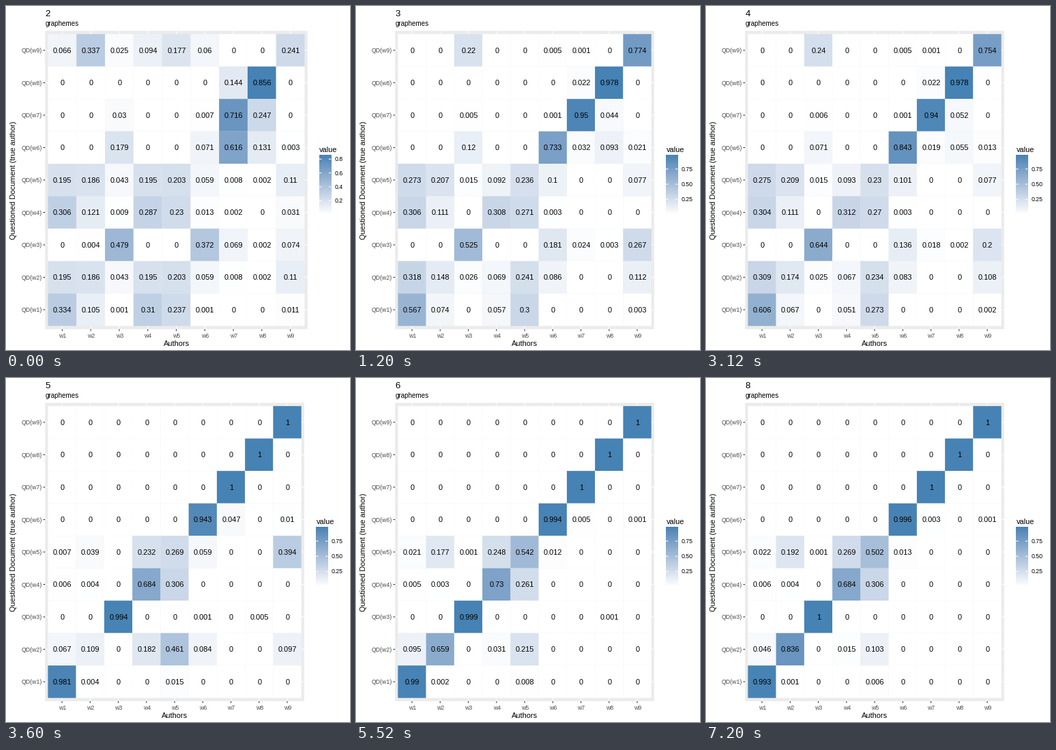
A matplotlib script that plays this animation: 504 by 504 pixels, repeating every 8 s.

```python
import numpy as np
import matplotlib.pyplot as plt
from matplotlib.animation import FuncAnimation
from matplotlib.patches import Rectangle

plt.rcParams["font.family"] = "Liberation Sans"

SIZE, DPI = 504, 72
N = 9
FIRST, LAST = 2, 8
LEFT, TOP, BOTTOM = 57.3, 36.4, 473.5
BAR_TOP, BAR_BOTTOM, BAR_WIDTH = 218, 304.6, 17.3
LABEL_RIGHT = 493.5
TICK = 2.75
LINE = 1.07
GREY_PANEL, GREY_TEXT, GREY_TICK = "#ebebeb", "#4d4d4d", "#333333"

# Every document starts out fully attributed to its true author (w9 on top).
tables = np.array([np.eye(N)[::-1] for _ in range(FIRST, LAST + 1)])


def spread(**weights):
    """Distribution over authors, normalised to one."""
    profile = np.zeros(N)
    for author, weight in weights.items():
        profile[int(author[1:]) - 1] = weight
    return profile / profile.sum()


def confuse(writer, first, shares, profile):
    """From step `first` on, move a share of the writer's row to a profile."""
    for step, share in enumerate(shares, first):
        row = share * profile
        row[writer - 1] += 1 - share
        tables[step - FIRST, N - writer] = row


# Few graphemes: w1, w2, w4 and w5 look alike.
alike = spread(w1=.195, w2=.186, w3=.043, w4=.195, w5=.203,
               w6=.059, w7=.008, w8=.002, w9=.11)
pair = spread(w1=.334, w2=.105, w3=.001, w4=.31, w5=.237, w6=.001, w9=.011)
confuse(1, 2, [1], pair)
confuse(2, 2, [1], alike)
confuse(4, 2, [1], 0.8 * pair + 0.2 * alike)
confuse(5, 2, [1], alike)
confuse(3, 2, [.521], spread(w2=.004, w6=.372, w7=.069, w8=.002, w9=.074))
confuse(6, 2, [.929], spread(w3=.179, w7=.616, w8=.131, w9=.003))
confuse(7, 2, [.284, .05, .06], spread(w3=.03, w6=.007, w8=.248))
confuse(8, 2, [.144, .022, .022], spread(w7=1))
confuse(9, 2, [.759], spread(w1=.066, w2=.337, w3=.025, w4=.094, w5=.177, w6=.06))

# The confusion narrows to the nearest hands.
confuse(1, 3, [.433, .394], spread(w2=.17, w4=.13, w5=.69, w9=.006))
confuse(2, 3, [.852, .826], spread(w1=.37, w3=.03, w4=.08, w5=.28, w6=.1, w9=.13))
confuse(3, 3, [.475, .356], spread(w6=.38, w7=.05, w8=.007, w9=.56))
confuse(4, 3, [.692, .688], spread(w1=.44, w2=.16, w5=.39, w6=.005))
confuse(5, 3, [.764, .77], spread(w1=.355, w2=.27, w3=.02, w4=.12, w6=.13, w9=.1))
confuse(6, 3, [.267, .157], spread(w3=.45, w7=.12, w8=.35, w9=.08))
confuse(9, 3, [.226, .246], spread(w3=.97, w6=.02, w7=.006))

# Many graphemes: only w2, w4 and w5 stay uncertain.
confuse(1, 5, [.019, .01, .008, .007], spread(w2=.2, w5=.8))
confuse(2, 5, [.542 + .349], spread(w1=.067, w4=.181, w5=.458, w6=.084, w9=.096))
confuse(2, 6, [.341, .138, .164], spread(w1=.28, w4=.09, w5=.63))
confuse(3, 5, [.006, .001, .001], spread(w6=.15, w8=.85))
confuse(4, 5, [.316, .27, .257, .316], spread(w1=.02, w2=.012, w5=.968))
confuse(5, 5, [.731], spread(w1=.007, w2=.039, w4=.231, w6=.059, w9=.392))
confuse(5, 6, [.458, .564, .498], spread(w1=.045, w2=.385, w3=.002, w4=.54, w6=.026))
confuse(6, 5, [.057, .006, .016, .004], spread(w7=.82, w9=.18))

# Colour ramp from white to steel blue, interpolated in CIE Lab.
WHITE_LAB = np.array([100, 0, 0])
STEEL_LAB = np.array([52.47, -4.07, -32.19])


def ramp(t):
    light, a, b = WHITE_LAB + t * (STEEL_LAB - WHITE_LAB)
    fy = (light + 16) / 116
    f = np.array([fy + a / 500, fy, fy - b / 200])
    xyz = np.where(f > 6 / 29, f ** 3, (f - 4 / 29) * 3 * (6 / 29) ** 2)
    xyz = xyz * [0.9505, 1, 1.089]
    lin = np.array([[3.2406, -1.5372, -0.4986],
                    [-0.9689, 1.8758, 0.0415],
                    [0.0557, -0.2040, 1.0570]]) @ xyz
    lin = np.clip(lin, 0, 1)
    rgb = np.where(lin > 0.0031308, 1.055 * lin ** (1 / 2.4) - 0.055, 12.92 * lin)
    return np.clip(rgb, 0, 1)


fig = plt.figure(figsize=(SIZE / DPI, SIZE / DPI), dpi=DPI, facecolor="white")
ax = fig.add_axes([0, 0, 1, 1])


def put(x, y, text, size, ha="left", color="black", angle=0):
    # The small offset makes glyphs round up to the next whole pixel.
    ax.text(x + 0.4, y, text, fontsize=size, ha=ha, va="baseline", color=color,
            rotation=angle, rotation_mode="anchor", zorder=4)


def box(x, y, w, h, color, zorder):
    ax.add_patch(Rectangle((x, y), w, h, facecolor=color, edgecolor="none",
                           linewidth=0, snap=False, zorder=zorder))


def line(x0, y0, x1, y1, color, zorder=3):
    ax.plot([x0, x1], [y0, y1], color=color, lw=LINE, snap=False,
            solid_capstyle="butt", zorder=zorder)


def draw_panel(table, right):
    dx = (right - LEFT) / (N + 0.2)
    dy = (BOTTOM - TOP) / (N + 0.2)
    xs = LEFT + dx * (0.6 + np.arange(N))
    ys = TOP + dy * (0.6 + np.arange(N))
    box(LEFT, TOP, right - LEFT, BOTTOM - TOP, GREY_PANEL, 0)
    for i, (x, y) in enumerate(zip(xs, ys)):
        line(LEFT, y, right, y, "white", 1)
        line(x, TOP, x, BOTTOM, "white", 1)
        line(LEFT - TICK, y, LEFT, y, GREY_TICK)
        line(x, BOTTOM, x, BOTTOM + TICK, GREY_TICK)
        put(52.3, y + 3.1, f"QD(w{N - i})", 8.8, "right", GREY_TEXT)
        put(x, 485.6, f"w{i + 1}", 8.8, "center", GREY_TEXT)
    top = table.max()
    for row, y in zip(table, ys):
        for value, x in zip(row, xs):
            box(x - dx / 2, y - dy / 2, dx, dy, ramp(value / top), 2)
            put(x, y + 4, f"{round(value, 3):g}", 11, "center")


def draw_legend(top, x, breaks, digits):
    put(x, 213.8, "value", 11)
    shades = np.array([[ramp(t)] for t in np.linspace(1, 0, 100)])
    ax.imshow(shades, extent=(x, x + BAR_WIDTH, BAR_BOTTOM, BAR_TOP),
              aspect="auto", interpolation="bilinear", zorder=2)
    for value in breaks:
        y = 305.6 - 87 * value / min(top, 0.98)
        line(x, y, x + BAR_WIDTH / 5, y, "white")
        line(x + BAR_WIDTH * 0.8, y, x + BAR_WIDTH, y, "white")
        put(x + BAR_WIDTH + 5, y + 3, f"{value:.{digits}f}", 8.8)


def draw(frame):
    step = min(frame // 3, LAST - FIRST)
    table = tables[step]
    top = table.max()
    if top < 0.9:
        breaks, digits, label_width = [0.2, 0.4, 0.6, 0.8], 1, 12.2
    else:
        breaks, digits, label_width = [0.25, 0.5, 0.75], 2, 17.1
    bar_x = LABEL_RIGHT - label_width - 5 - BAR_WIDTH
    right = bar_x - 17.3

    ax.clear()
    draw_panel(table, right)
    draw_legend(top, bar_x, breaks, digits)
    put(LEFT, 15, str(step + FIRST), 13.2)
    put(LEFT, 29, "graphemes", 9.9)
    put((LEFT + right) / 2, 498, "Authors", 11, "center")
    put(13.6, (TOP + BOTTOM) / 2, "Questioned Document (true author)", 11,
        "center", angle=90)
    ax.set_xlim(0, SIZE)
    ax.set_ylim(SIZE, 0)
    ax.axis("off")
    return []


anim = FuncAnimation(fig, draw, frames=20, interval=400, repeat=True,
                     init_func=lambda: [], blit=False)
plt.show()
```
